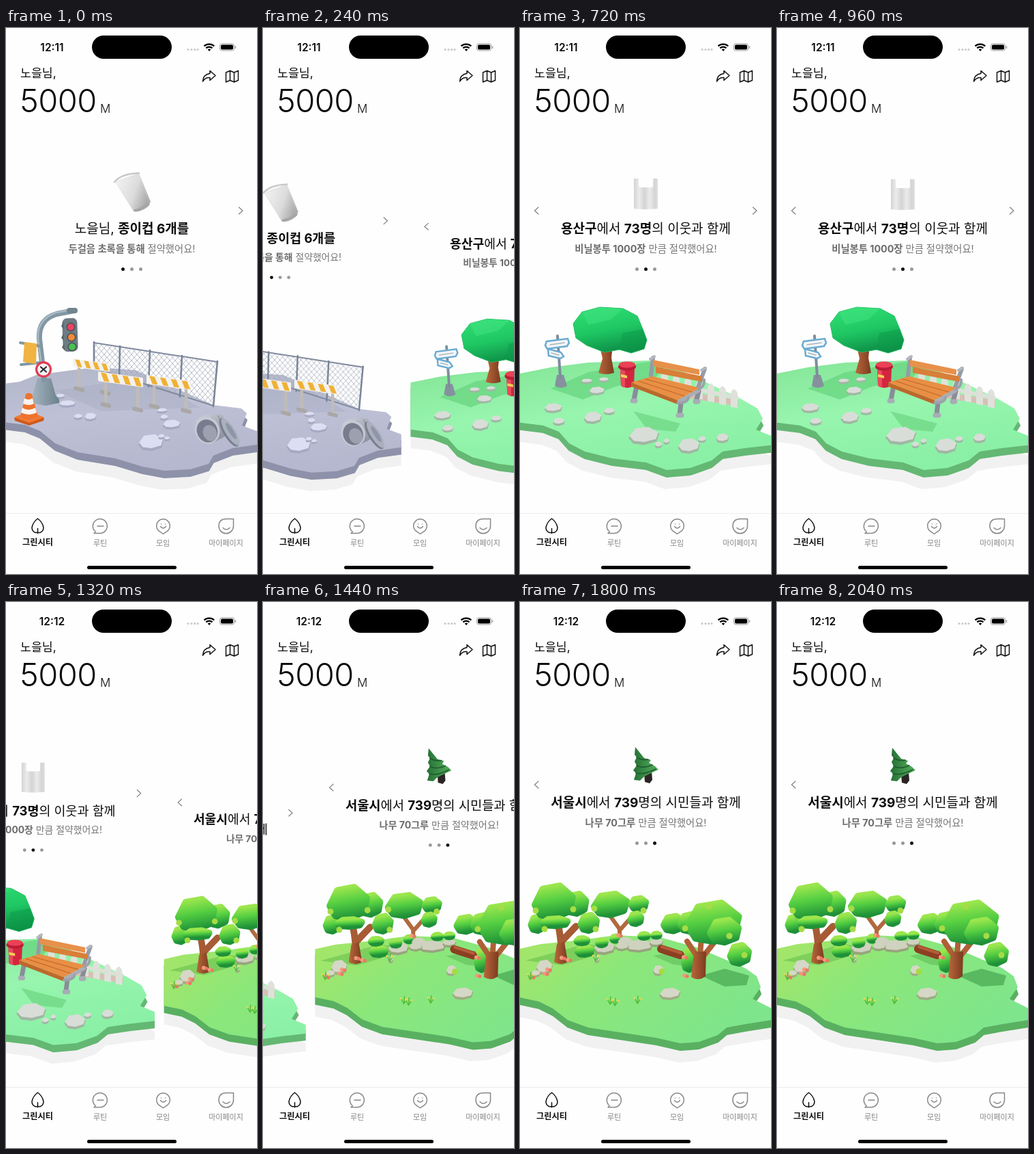
Animation of 368x798 px, one loop 2.16 s. Source, as an HTML page:

```html
<!DOCTYPE html>
<html lang="ko">
<head>
<meta charset="utf-8">
<title>그린시티</title>
<style>
html, body { margin: 0; width: 100%; height: 100%; overflow: hidden; background: #fefefe; }
#stage { display: block; width: 100vw; height: 100vh; }
text { font-family: Inter, "Noto Sans CJK KR", "Noto Sans CJK", sans-serif; fill: #0b0b0b; }
.mid { text-anchor: middle; }
.title { font-size: 19px; }
.sub { font-size: 14.3px; fill: #777; }
.sub .b { fill: #6c6c6c; }
.b { font-weight: 700; }
.tab { font-size: 11px; fill: #858585; }
.tab.on { font-size: 12.2px; font-weight: 600; fill: #0b0b0b; }
.ico { fill: none; stroke: #111; stroke-width: 1.5; stroke-linecap: round; stroke-linejoin: round; }
.off { stroke: #888; }
</style>
</head>
<body>
<svg id="stage" viewBox="0 0 368 798">
  <defs>
    <linearGradient id="gray" x1="0" y1="0" x2=".3" y2="1"><stop offset="0" stop-color="#b2b6c8"/><stop offset=".5" stop-color="#bec1d6"/><stop offset="1" stop-color="#b5b8ce"/></linearGradient>
    <linearGradient id="mint" x1="0" y1="0" x2=".4" y2="1"><stop offset="0" stop-color="#84e596"/><stop offset=".5" stop-color="#97f5ae"/><stop offset="1" stop-color="#8af0a5"/></linearGradient>
    <linearGradient id="lawn" x1="0" y1="0" x2="1" y2=".5"><stop offset="0" stop-color="#a9e566"/><stop offset=".45" stop-color="#8be77a"/><stop offset="1" stop-color="#7fe58c"/></linearGradient>
    <linearGradient id="crown" x1=".3" y1="0" x2=".6" y2="1"><stop offset="0" stop-color="#2fdc72"/><stop offset=".5" stop-color="#1fc763"/><stop offset="1" stop-color="#0c8a45"/></linearGradient>
    <linearGradient id="leaf" x1=".4" y1="0" x2=".6" y2="1"><stop offset="0" stop-color="#9be64d"/><stop offset=".45" stop-color="#55cf42"/><stop offset="1" stop-color="#1e9138"/></linearGradient>
    <linearGradient id="bark"><stop offset="0" stop-color="#b9683a"/><stop offset="1" stop-color="#7c3b20"/></linearGradient>
    <linearGradient id="steel"><stop offset="0" stop-color="#a4b5bf"/><stop offset="1" stop-color="#6d818e"/></linearGradient>
    <linearGradient id="tin" x2="1" y2="1"><stop offset="0" stop-color="#d3d6df"/><stop offset="1" stop-color="#7e8492"/></linearGradient>
    <linearGradient id="paper" x1="0" y1=".3" x2="1" y2=".7"><stop offset="0" stop-color="#efefef"/><stop offset=".55" stop-color="#dcdcdc"/><stop offset="1" stop-color="#a9a9a9"/></linearGradient>
    <linearGradient id="film" spreadMethod="reflect" x2=".22"><stop offset="0" stop-color="#d4d4d4"/><stop offset="1" stop-color="#ebebeb"/></linearGradient>
    <linearGradient id="fir"><stop offset="0" stop-color="#256f36"/><stop offset="1" stop-color="#56b05c"/></linearGradient>
    <pattern id="mesh" width="8" height="9" patternUnits="userSpaceOnUse"><path d="M0 0L8 9M8 0L0 9" stroke="#a3aab9" stroke-width=".8"/></pattern>
  </defs>

  <g id="pages"></g>

  <text id="clock" class="mid" x="67.5" y="34" font-size="15.5" font-weight="600"></text>
  <rect x="126" y="11" width="117" height="34" rx="17"/>
  <path d="M267 31.5h.01M272 31.5h.01M276.700 31.500h.01M281 31.500h.01" stroke="#c9c9c9" stroke-width="3.200" stroke-linecap="round"/>
  <g fill="none" stroke="#000" stroke-width="2.200"><path d="M290.500 26.500a10.800 10.800 0 0 1 14.800 0M293.300 29.400a6.700 6.700 0 0 1 9.200 0"/><path d="M298 34l-2.300-2.500a3.500 3.500 0 0 1 4.600 0z" fill="#000" stroke="none"/></g>
  <rect x="313.500" y="23" width="21" height="10" rx="3" fill="none" stroke="#999"/>
  <rect x="315" y="24.500" width="18" height="7" rx="1.800"/>
  <path d="M336.500 26.300v3.500" stroke="#999" stroke-width="1.400"/>

  <text x="21" y="72" font-size="17.300">노을님,</text>
  <text x="20.500" y="122.500" font-size="47" font-weight="300" letter-spacing="-.5">5000</text>
  <text x="138" y="123.500" font-size="17" font-weight="300">M</text>
  <path class="ico" d="M299 62.500l8 7-8 7v-4q-7-.5-10.500 5.500q.5-10 10.500-11.500z"/>
  <path class="ico" d="M322.500 65l6-2.500 6 2.500 6-2.500v14l-6 2.500-6-2.500-6 2.500zM328.500 62.500v14M334.500 65v14"/>

  <rect y="709" width="368" height="89" fill="#fefefe"/>
  <path d="M0 709.500H368" stroke="#ececec"/>
  <path class="ico" d="M46.500 738.500v-7M43 737.500q-5-2-5-7.500 1.500-8 8.500-13 7 5 8.500 13 0 5.500-5 7.500z"/>
  <g class="ico off">
    <path d="M130 735a10.500 10.500 0 1 1 8.500 3.500h-9.500l2.500-2.500M134 728h9"/>
    <path d="M230.500 739.500l-4.500-3.200a9.800 9.800 0 1 1 9 0zM226.500 728.500q4 5 8 0M227.500 725h.01M233.500 725h.01"/>
    <path d="M312 728q0-10.500 11-10.500h10.500v10.500a10.700 10.700 0 0 1-21.500 0zM318 730.500q5 5 10 0"/>
  </g>
  <text class="mid tab on" x="46.500" y="756">그린시티</text>
  <text class="mid tab" x="138" y="756.500">루틴</text>
  <text class="mid tab" x="230" y="756.500">모임</text>
  <text class="mid tab" x="322.500" y="756.500">마이페이지</text>
  <rect x="119" y="786" width="131" height="5" rx="2.500"/>
</svg>
<script>
const fill = (d, color, more = '') => `<path d="${d}" fill="${color}" ${more}/>`;
const line = (d, color, width) => `<path d="${d}" fill="none" stroke="${color}" stroke-width="${width}" stroke-linecap="round"/>`;
const dot = (x, y, r, color) => `<circle cx="${x}" cy="${y}" r="${r}" fill="${color}"/>`;
const oval = (x, y, rx, ry, color, turn = 0) =>
  `<ellipse cx="${x}" cy="${y}" rx="${rx}" ry="${ry}" fill="${color}" transform="rotate(${turn} ${x} ${y})"/>`;
const repeat = (n, make) => Array.from({ length: n }, (_, i) => make(i)).join('');

const island = (d, top, side) =>
  fill(d, '#f1f1f1', 'transform="translate(-3 28)"') +
  fill(d, side, `transform="translate(0 10)" stroke="${side}" stroke-width="2"`) + fill(d, top);

const outline = [[-.5, .1], [-.3, -.4], [.15, -.5], [.48, -.15], [.4, .3], [0, .5], [-.35, .42]];
const facet = (x, y, w, h) => 'M' + outline.map(([u, v]) => `${x + u * w} ${y + v * h}`).join('L') + 'Z';
const rock = (x, y, w, h, light, dark) => fill(facet(x, y + 1.500, w, h), dark) + fill(facet(x, y - 1, w * .94, h * .85), light);
const rocks = (light, dark, list) => list.map(r => rock(...r, light, dark)).join('');
const bush = (x, y, w, h) => fill(facet(x, y, w - 10, h - 10), 'url(#leaf)', 'stroke="url(#leaf)" stroke-width="10" stroke-linejoin="round"');

const barrier = (x, y, w, h, leg) => `<g transform="translate(${x} ${y}) skewY(8)">` +
  [w * .17, w * .88].map(u => line(`M${u} 4V${leg}`, '#bfbcb8', 4.500) + line(`M${u - 5} ${leg}L${u + 5} ${leg + 1}`, '#aaa7a6', 6)).join('') +
  `<rect width="${w}" height="${h}" rx="1.500" fill="#f4f2ee"/>` +
  repeat(4, i => fill(`M${w * (.06 + i * .24)} 1h${w * .12}l${w * .07} ${h - 2}h${-w * .12}z`, '#efb135')) + '</g>';

function street() {
  const posts = [[129, 459, 497], [167, 465, 510], [211, 471, 524], [258, 479, 539], [308, 487, 553]];
  return island('M-5 520L20 517 45 507 90 501 130 496 190 500 304 551 345 556 353 563 346 581 375 592V608L332 614 304 625 297 637 270 645 232 647 200 641 160 629 105 620 72 607 50 589 28 580 -5 576Z', 'url(#gray)', '#8d91a9') +
    fill('M72 530L205 510 285 555 140 560Z', '#a7aac0', 'opacity=".45"') +
    fill('M129 461L310 489 304 551 129 497Z', 'url(#mesh)') +
    line('M129 460L310 488M129 497L304 552', '#808a9e', 2) +
    posts.map(([x, a, b], i) => line(`M${x + (i === 4 ? 2 : 0)} ${a}L${x - i} ${b}`, '#7a859a', 2.600)).join('') +
    rocks('#dcdff2', '#a5a9c2', [[90, 549, 25, 9], [124, 568, 18, 11], [106, 568, 13, 7], [80, 538, 13, 6], [213, 605, 38, 24], [243, 579, 27, 13], [232, 569, 12, 7], [229, 559, 16, 6], [228, 597, 10, 6], [236, 600, 9, 5]]) +
    barrier(98, 483, 54, 12, 43) + barrier(206, 507, 66, 13, 44) + barrier(135, 502, 66, 14, 47) +
    fill('M46 512H66L73 537 78 543V548L58 552 37 548V543Z', 'url(#steel)') +
    line('M56 514L49 455Q47 426 74 418L100 413', '#8197a4', 8) + line('M53 500L47 455Q45 426 73 416L100 411', '#a7bac4', 2.500) +
    line('M21 460L50 465M22 492L50 489', '#8197a4', 4) + line('M93 413H101', '#71858f', 8) +
    fill('M28 460L44 462 43 490 26 487Z', '#f1b442', 'stroke="#f1b442" stroke-width="2" stroke-linejoin="round"') +
    `<rect x="83" y="424" width="22" height="49" rx="7" fill="#6d7b83" transform="rotate(-2 94 448)"/>` +
    fill('M84 429l-3 7 4 4zM84 446l-3 7 4 4zM85 461l-3 6 4 4z', '#56646c') +
    dot(95, 437, 6.500, '#46515a') + dot(96, 452, 6.500, '#46515a') + dot(97, 466, 6.500, '#46515a') +
    dot(95, 437, 5, '#ef4260') + dot(96, 452, 5, '#f48a35') + dot(97, 466, 5, '#48c34f') +
    dot(55, 499, 12, '#df3d52') + dot(55, 499, 8.800, '#f5f4f4') + line('M51 495.500l8 7M59 495.500l-8 7', '#2c2e34', 2.300) +
    fill('M12 570L34 561 56 570 55 574 34 581 13 574Z', '#cf5a1d') + fill('M12 569L34 560 56 569 34 577Z', '#f17b33') +
    fill('M29 535Q33 532 38 535L47 568Q34 576 21 568Z', '#ee732e') +
    fill('M27 541Q33 545 39 541L41 549Q34 553 25 549ZM24 555Q33 561 43 555L45 562Q34 568 22 562Z', '#f8f4f0') +
    fill('M278 575Q290 560 318 566L326 594 302 607Z', 'url(#tin)') + line('M302 570L316 600M311 567L323 595', '#8c92a0', 1.200) +
    oval(295, 588, 18, 20, '#c6cad5', -25) + oval(295, 589, 15, 17, '#777d8e', -25) + oval(299, 592, 10, 12, '#9ca1b0', -25) +
    oval(327, 591, 8, 24, '#787f8f', -32) + oval(329, 590, 7, 23, '#aab0be', -32) + oval(330, 589, 3.500, 14, '#8f96a7', -32);
}

function park() {
  const slat = t => `M${195 + t * 4} ${485 + t * 10}l68 14v8l-68 -13z`;
  return island('M-5 506L45 496 100 489 190 486 235 500 322 541 348 556 356 571 346 587 375 599V609L330 614 297 619 281 632 250 643 215 646 185 635 135 629 95 619 72 607 57 590 34 581 -5 576Z', 'url(#mint)', '#64b873') +
    fill('M45 527L100 503 188 488 215 492 200 510 140 524 92 543Z', '#69d681', 'opacity=".75"') +
    fill('M166 560L235 578 228 590 186 586Z', '#72da88', 'opacity=".8"') +
    fill('M117 466L136 464 134 482 138 504Q126 508 115 504L121 483Z', 'url(#bark)') +
    fill('M78 432L91 415 117 408 151 410 172 421 180 440 186 456 182 469 163 475 146 470 124 474 98 464 82 453Z', 'url(#crown)', 'stroke="#22bd62" stroke-linejoin="round"') +
    fill('M91 415L117 408 151 410 134 426 100 434Z', '#46e584', 'opacity=".45"') + fill('M146 470L150 446 180 440 186 456 182 469 163 475Z', '#0d9c4b', 'opacity=".5"') +
    rocks('#d9ddd8', '#a1b7a4', [[49, 555, 27, 13], [57, 575, 18, 10], [131, 560, 17, 9], [107, 569, 27, 17], [113, 530, 24, 11], [98, 516, 17, 6], [123, 514, 15, 6], [182, 595, 46, 26], [248, 610, 33, 22], [297, 599, 19, 13], [203, 609, 11, 8], [215, 604, 9, 7], [267, 601, 12, 8]]) +
    fill('M51 523L54 507H64L69 523Q60 529 51 523Z', '#85929e') + line('M55 450L59 510', '#7f8d9b', 4) +
    fill('M39 458L70 454 72 460 69 465 40 469 37 464Z', '#f3f6f7', 'stroke="#69abd2" stroke-width="2.500"') +
    fill('M41 469L60 474 64 480 59 483 42 479Z', '#f3f6f7', 'stroke="#69abd2" stroke-width="2.500"') +
    line('M44 463L65 460M46 475L57 478', '#a9b4bd', 1.500) +
    fill('M147 497H168L167 523Q157 529 148 523Z', '#d3263e') + fill('M147 497h7v28q-4 0-6-2z', '#e94a5d') +
    oval(157, 495, 13, 6, '#b91d35') + oval(157, 492, 12, 4.500, '#ec4057') + fill('M148 506l9 2v4l-9-2z', '#f3cf56') +
    fill('M205 525L320 544V553L205 534Z', '#d8bfb5') +
    repeat(7, i => { const x = 207 + i * 17, y = 502 + i * 4.300; return fill(`M${x} ${y + 5}q5-10 10 1v22l-10-2z`, '#dfe2da'); }) +
    fill('M205 513L320 538V544L205 519Z', '#dde0d8') +
    line('M195 482L192 508M271 498L260 528', '#969ba5', 6) + line('M197 480l-6 4M272 497l-6 3', '#b3b7bf', 4) +
    fill(slat(0), '#e7914a') + fill(slat(1), '#d87f38') +
    line('M170 528L167 544M236 548L234 565M262 531L258 546', '#888d98', 7) + line('M165 545h4M232 566h5M257 546h4', '#a8adb5', 7) +
    fill('M163 518L194 509 264 526 231 544Z', '#e98f45') + fill('M163 518L231 544V550L163 524Z', '#bd682b') + fill('M231 544L264 526V532L231 550Z', '#a9aeb7') +
    line('M174 516L241 538M184 513L252 532', '#bd692c', 1.200) + line('M231 548Q246 548 247 540M262 528Q271 524 270 514', '#9ca1ab', 4);
}

function grove() {
  const sprout = (x, y) => line(`M${x} ${y}l-4-8M${x} ${y}l1-11M${x} ${y}l5-7`, '#55bd3a', 1.500) + dot(x - 4, y - 8, 1.500, '#f3d750') + dot(x + 5, y - 7, 1.500, '#f3d750');
  const fruit = list => list.map(([x, y]) => dot(x, y, 4.500, '#a4dc45')).join('');
  const bloom = list => list.map(([x, y]) => dot(x - 2, y, 3, '#f39a7c') + dot(x + 2, y + 1, 2.600, '#ea7965')).join('');
  return island('M-5 508L30 500 90 494 140 487 205 490 260 505 330 535 347 547 353 563 341 580 375 597V610L330 617 303 622 290 633 262 643 235 645 200 637 140 628 100 622 70 611 48 594 28 584 -5 577Z', 'url(#lawn)', '#59b061') +
    fill('M265 546L300 536 336 546 332 560 300 562Z', '#4fae58', 'opacity=".8"') + fill('M8 524L95 500 150 505 62 531Z', '#6bc051', 'opacity=".6"') +
    fill('M195 517L245 508 255 533 225 530Z', '#62bd5a', 'opacity=".6"') +
    line('M146 492V478L133 460M146 480L162 462', '#b06a3e', 6) +
    bush(133, 442, 58, 40) + bush(174, 441, 31, 25) + bush(170, 463, 25, 24) + bush(140, 492, 18, 15) +
    rocks('#cfd2bf', '#98a47e', [[124, 505, 32, 19], [154, 496, 22, 13], [175, 502, 42, 18], [200, 497, 21, 12], [150, 503, 20, 12]]) +
    bush(182, 488, 20, 14) + bush(200, 487, 18, 13) + bush(95, 510, 30, 20) + bush(91, 495, 25, 16) + bush(120, 498, 20, 16) +
    line('M61 524Q61 497 57 477M62 495L82 474', '#a65b34', 10) + fill('M54 500Q58 500 65 496L70 526Q60 532 50 526Z', 'url(#bark)') +
    bush(26, 470, 29, 30) + bush(101, 469, 33, 32) + bush(83, 441, 38, 38) + bush(50, 438, 66, 56) + bush(52, 468, 46, 20) +
    fruit([[23, 451], [78, 449], [36, 478], [111, 478], [109, 448], [181, 451]]) +
    rocks('#d5d8c6', '#9ead85', [[36, 533, 25, 22], [23, 543, 14, 9], [220, 572, 32, 17], [203, 538, 16, 15], [113, 521, 8, 11]]) +
    bush(248, 523, 24, 38) + bush(322, 515, 37, 36) +
    line('M207 507L235 516', '#8b3f23', 12) + line('M208 504L236 513', '#b65c38', 4) +
    line('M261 520L245 496M267 520L286 496M264 516L266 490', '#ae6037', 8) + fill('M255 511H273L272 547Q262 555 251 548Z', 'url(#bark)') +
    bush(225, 470, 38, 31) + bush(248, 469, 34, 34) + bush(284, 468, 86, 66) + bush(300, 481, 52, 42) +
    fruit([[242, 477], [307, 488], [277, 445], [329, 516], [208, 540]]) +
    bloom([[38, 543], [72, 523], [63, 520], [18, 548], [243, 546], [242, 519], [146, 487], [42, 537]]) +
    sprout(132, 588) + sprout(172, 587) + sprout(15, 552) + sprout(139, 590) + sprout(111, 525);
}

const cup = fill('M159 224L195 212 212 254Q204 266 187 268Z', 'url(#paper)') + oval(199, 262, 13, 4, '#a6a6a6', -25) +
  fill('M163 226L196 216 208 253Q201 263 188 265Z', 'url(#paper)') + line('M159 225Q169 213 195 212', '#c9c9c9', 2.500);
const bag = fill('M167 221h7v11q1 2 3 2h15q3 0 3-2v-11h7v44q-18 2-35 0z', 'url(#film)');
const fir = fill('M182 250L193 248 194 261 190 266 183 264Z', '#2b2424') +
  fill('M169 213L182 229 192 232 189 236 198 241 203 246 188 253 181 257 176 262 167 261 170 251 166 247 171 240 168 234 171 228 168 224Z', 'url(#fir)') +
  line('M171 228Q179 233 188 231M171 240Q180 245 194 239M170 251Q182 254 199 245', '#1d5a2c', 1.600);

const arrow = { left: line('M27 262L21.500 267 27 272', '#858585', 1.300), right: line('M341.500 262L347 267 341.500 272', '#858585', 1.300) };
const screens = [
  { icon: cup, scene: street, arrows: ['right'], title: '노을님, <tspan class="b">종이컵 6개를</tspan>', sub: '<tspan class="b">두걸음 초록을 통해</tspan> 절약했어요!' },
  { icon: bag, scene: park, arrows: ['left', 'right'], title: '<tspan class="b">용산구</tspan>에서 <tspan class="b">73명</tspan>의 이웃과 함께', sub: '<tspan class="b">비닐봉투 1000장</tspan> 만큼 절약했어요!' },
  { icon: fir, scene: grove, arrows: ['left'], title: '<tspan class="b">서울시</tspan>에서 <tspan class="b">739</tspan>명의 시민들과 함께', sub: '<tspan class="b">나무 70그루</tspan> 만큼 절약했어요!' }
];

document.getElementById('pages').innerHTML = screens.map((s, n) =>
  `<g class="page"><svg width="368" height="798" overflow="hidden"><g class="icon">${s.icon}</g>` +
  s.arrows.map(a => arrow[a]).join('') +
  `<text class="mid title" x="184.500" y="300">${s.title}</text><text class="mid sub" x="184.500" y="327.500">${s.sub}</text>` +
  repeat(3, i => dot(171.500 + i * 13, 352.500, 2.500, i === n ? '#111' : '#999')) + s.scene() + '</svg></g>').join('');

const pages = document.querySelectorAll('.page');
const icons = document.querySelectorAll('.icon');
const clock = document.getElementById('clock');
const STEP = 120;
const scroll = [0, .1, .433, .79, .948, .987, 1, 1, 1, 1, 1.06, 1.393, 1.8, 1.958, 1.99, 2, 2, 2];

// The icon hovers up once per 1080 ms.
function hover(ms) {
  const p = (ms % 1080 - 220) / 560;
  return p > 0 && p < 1 ? -8.500 * Math.sin(Math.PI * p) ** 2 : 0;
}

function draw() {
  const tick = Math.floor(performance.now() / STEP) % scroll.length;
  const ms = tick * STEP;
  pages.forEach((page, n) => {
    const d = n - scroll[tick], far = Math.abs(d);
    page.style.display = far < 1.1 ? '' : 'none';
    page.setAttribute('transform', `translate(${184 + 368 * d} ${293 + 58 * far ** 1.7}) scale(${1 - .074 * far}) translate(-184 -293)`);
    icons[n].setAttribute('transform', `translate(0 ${hover(ms)})`);
  });
  clock.textContent = ms < 1080 ? '12:11' : '12:12';
  requestAnimationFrame(draw);
}
draw();
</script>
</body>
</html>
```
